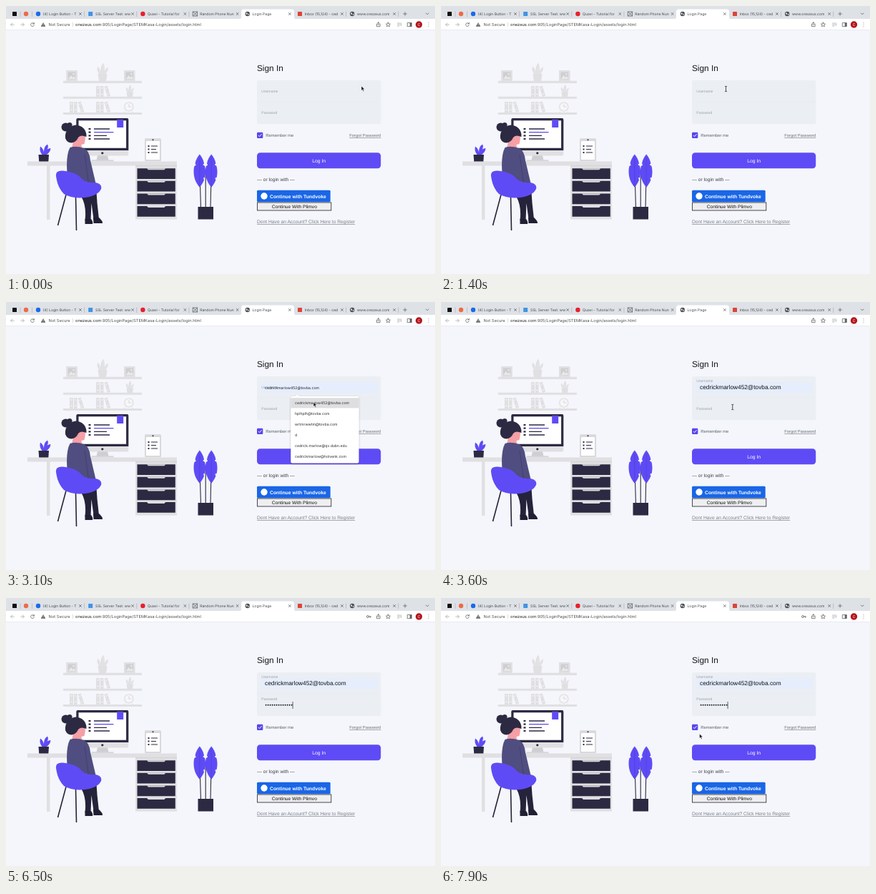
Recreate the animation shown at these times as an HTML page. Size 600 by 375 pixels, loop 8000 ms.

```html
<!DOCTYPE html>
<html lang="en">
<head>
<meta charset="utf-8">
<title>Login Page</title>
<style>
html, body { margin: 0; width: 100%; height: 100%; overflow: hidden; background: #f4f6fb; }
svg { display: block; width: 600px; height: 375px; }
text { font-family: "Liberation Sans", Arial, sans-serif; white-space: pre; text-rendering: geometricPrecision; }
.ui, .ui text { font-family: Inter, Roboto, sans-serif; }
.tabs text { font-size: 5.050px; fill: #45484d; }
.line { fill: none; stroke: #5f6368; stroke-width: .8; stroke-linecap: round; stroke-linejoin: round; }
.faint { stroke: #a9acb1; }
.hint { font-size: 5px; fill: #9a9fa8; }
.pale { fill: #e0e0e2; }
.ink { fill: #2c2a42; }
.hue { fill: #5f4bf5; }
</style>
</head>
<body>
<svg viewBox="0 0 600 375">
  <defs>
    <filter id="shade" x="-10%" y="-20%" width="120%" height="150%">
      <feDropShadow dx="0" dy=".8" stdDeviation="1.1" flood-color="#000" flood-opacity=".32"/>
    </filter>
    <g id="globe">
      <circle r="3.2" fill="#4a4d52"/>
      <path d="M-2.4-1.2Q-.6-2.4 0-.8T-1.4 1.3ZM.8.2L2.5-.5Q2.6 1.2 1 2.3Z" fill="#dfe2e7"/>
    </g>
    <g id="books">
      <path class="pale" d="M0 0h5v15h-5zM6 0h4.500v15h-4.500zM11.500.8l4.300-1.300 4.400 14.300-4.300 1.300z"/>
      <path d="M1 3h3M1 11.500h3M7 3h2.500M7 11.500h2.500M13 3.500l2.800-.9M15.500 11.500l2.800-.9" stroke="#f6f6f8" stroke-width="1"/>
    </g>
    <g id="frame">
      <path class="pale" d="M0 0h15.500v15H0z"/>
      <path d="M2.500 2.500h10.500v10h-10.500z" fill="#cfcfd2"/>
      <path d="M3 12l3.500-5 2.500 3 2-2 2 4z" fill="#e9e9eb"/>
      <circle cx="10.300" cy="5.200" r="1.200" fill="#e9e9eb"/>
    </g>
    <g id="sprig">
      <path d="M5 17Q-1 12 1 5Q6 9 6 16Q4 6 9 0Q13 7 8.500 17Q10 9 16 6Q16 13 10 17Z"/>
      <path d="M2 7L6 16M9 3L7.500 16M14.500 8L9 16" fill="none" stroke="#fff" stroke-opacity=".45" stroke-width=".5"/>
    </g>
    <g id="leaf">
      <path class="hue" d="M0-22.500C3-19 5.500-14.500 6.200-9.500L4.500-8L7.300-6C8.600-1 8.700 5 7.400 10L5.200 10.500L6.200 13.500C4.600 17.500 2.500 21 0 23.500C-2.500 21-4.600 17.500-6.200 13.500C-8.400 8-9-1-7.300-6L-5-7.500L-6.200-9.500C-5.500-14.500-3-19 0-22.500Z"/>
      <path d="M0-18V23" stroke="#4a3bcb" stroke-width=".5"/>
    </g>
    <g id="drawer">
      <path class="ink" d="M0 0h53.300v14.800H0z"/>
      <path d="M13.500 0h26.300l-2 2h-22.300z" fill="#dcdcdf"/>
    </g>
  </defs>

  <rect width="600" height="375" fill="#f4f6fb"/>

  <!-- browser -->
  <g class="ui">
    <rect width="600" height="19" fill="#dee1e6"/>
    <path d="M325 19Q329 19 329 15V8Q329 4.500 332.500 4.500H399.500Q403 4.500 403 8V15Q403 19 407 19Z" fill="#fff"/>
    <rect y="18" width="600" height="15.500" fill="#fff"/>
    <rect y="33.200" width="600" height=".6" fill="#dfe1e5"/>
    <g class="tabs" id="tabs"></g>
    <path class="line" d="M555.800 11h4.600M558.100 8.700v4.600M587.500 10l1.800 1.900 1.800-1.900"/>
    <path class="line faint" d="M11.300 26H6.700M8.800 23.800L6.600 26l2.200 2.200M20.700 26h4.600M23.200 23.800l2.200 2.200-2.200 2.200"/>
    <path class="line" d="M39 24.700a2.400 2.400 0 1 0 .3 2.100M39.300 23.300v1.700h-1.700"/>
    <path d="M52 22.900L55.300 28.700H48.700Z" fill="#5f6368"/>
    <path d="M52 24.700v2M52 27.300v.7" stroke="#fff" stroke-width=".6"/>
    <text x="59.600" y="28" font-size="5.700" fill="#4d5156">Not Secure</text>
    <path d="M93.500 23v6" stroke="#c5c8cd" stroke-width=".6"/>
    <text x="97" y="28" font-size="5.730" fill="#202124">onezeus.com<tspan fill="#4a4d52">:905/LoginPage/STEMKasa-Login/assets/login.html</tspan></text>
    <g id="key" class="line"><circle cx="506" cy="26" r="1.500"/><path d="M507.500 26h3M509.700 26v1.400"/></g>
    <path class="line" d="M519.300 25.200h-.8v3.500h4.600v-3.500h-.8M520.800 26.800v-3.900M519.500 24l1.300-1.300 1.300 1.300" stroke-width=".6"/>
    <path class="line" d="M534.500 23l.9 2 2.100.2-1.600 1.500.5 2.100-1.900-1.100-1.900 1.100.5-2.100-1.600-1.500 2.100-.2z" stroke-width=".6"/>
    <path class="line faint" d="M547.500 24h4M547.500 26h4M547.500 28h2.500M552.800 24v3.700"/>
    <path class="line" d="M561.700 23.500h5.600v5.200h-5.600z"/>
    <path d="M564.700 23.500h2.600v5.200h-2.600z" fill="#5f6368"/>
    <circle cx="577.500" cy="26" r="4.700" fill="#b5161f"/>
    <text x="577.500" y="27.900" font-size="5" fill="#fff" text-anchor="middle">C</text>
    <path d="M591 23.600v.01M591 26v.01M591 28.400v.01" class="line" stroke-width="1.300"/>
  </g>

  <!-- shelves -->
  <path class="pale" d="M80 104.800h110v3.300H80zM80 126.800h110v3H80zM80 149h110v3H80z"/>
  <use href="#frame" x="84.300" y="90"/><use href="#frame" x="165" y="90"/>
  <use href="#books" x="126" y="112"/><use href="#books" x="89" y="134"/><use href="#books" x="126" y="134"/>
  <g class="pale">
    <use href="#sprig" x="127" y="79.500"/>
    <path d="M128.500 95h13l-1.500 10h-10z"/>
    <use href="#sprig" transform="translate(167.500 110) scale(.7)"/>
    <path d="M168.500 120.500h9.500l-1 6.500h-7.500z"/>
    <circle cx="171.800" cy="141" r="6.800"/>
  </g>
  <path d="M167 147.500l-1.500 2M176.600 147.500l1.500 2" stroke="#e0e0e2"/>
  <circle cx="171.800" cy="141" r="5.400" fill="#f6f6f8"/>
  <path d="M171.800 137.500v3.500h3.300" fill="none" stroke="#c6c6ca" stroke-width=".6"/>

  <!-- desk -->
  <path class="pale" d="M30 217.500h209v6H30zM57 223h4.500v76H57zM181 223h58v75.500h-58z"/>
  <path d="M181 223.500h58" stroke="#cecfd3" stroke-width=".7"/>
  <use href="#drawer" x="183.500" y="227.200"/><use href="#drawer" x="183.500" y="244.800"/>
  <use href="#drawer" x="183.500" y="262.400"/><use href="#drawer" x="183.500" y="280"/>

  <!-- monitor -->
  <path d="M128 209h14l1.500 7h-17z" fill="#cfcfd3"/>
  <path d="M119.500 215.300h31v2.200h-31z" fill="#d6d6da"/>
  <rect x="98.300" y="157" width="73" height="52.500" rx="2" class="pale"/>
  <path class="ink" d="M98.300 202V159q0-2 2-2h69q2 0 2 2v43z"/>
  <path d="M101.500 160.300h66.600v38.400h-66.600z" fill="#fff"/>
  <circle class="ink" cx="134.800" cy="205.800" r="1.600"/>
  <path class="hue" d="M155.200 158.800h9v11.200h-9z"/>
  <path d="M115.500 172h3M115.500 176.700h3M115.500 181.400h3M115.500 186h3" stroke="#2c2a42" stroke-width="2.200"/>
  <path d="M123 172h22M123 181.400h18M123 186h22" stroke="#2c2a42" stroke-width="1.300"/>
  <path d="M123 176.700h27.500" stroke="#5f4bf5" stroke-width="1.300"/>

  <!-- tablet and pot -->
  <rect x="194" y="185.300" width="23" height="32" rx="1.500" fill="#d9d9dc"/>
  <path d="M196 189h19v26h-19z" fill="#fff"/>
  <circle class="ink" cx="205.500" cy="187.200" r="1"/>
  <path d="M198.500 196h2M198.500 200.500h2M198.500 205h2" stroke="#2c2a42" stroke-width="2"/>
  <path d="M203 196h9M203 200.500h7M203 205h9" stroke="#2c2a42" stroke-width="1"/>
  <path class="hue" d="M51 208.500Q46 203 48 196.500Q52.500 200 53 205Q52.500 197 58 193.500Q60 197 57.500 200.500Q60 199 62.500 199Q62 205 56 208.500Z"/>
  <path class="ink" d="M45.500 208h14.500l-.7 9.500H46.200z"/>

  <!-- tall plant -->
  <path d="M271.500 250L272.500 283M279.200 232V283M286.700 250L286 283" stroke="#2c2a42" stroke-width="1.100" fill="none"/>
  <use href="#leaf" transform="translate(270.800 230)"/>
  <use href="#leaf" transform="translate(287.200 230)"/>
  <path class="ink" d="M268.500 281h21.500v17.500h-21.500z"/>

  <!-- sitter -->
  <path d="M84 264L72.500 307M97.500 266L98.500 314" stroke="#25233a" stroke-width="1.600"/>
  <path d="M101 254L126 252Q127 275 130 298H122.500L119.500 276L118.500 300H110.500Q113 280 105 266Z" fill="#25233a"/>
  <path d="M110.500 298h8.500q3 4 2 7h-10.500zM122 296h8q5.500 5 5 8h-12.500z" fill="#211f33"/>
  <path d="M96 178L110 178Q112 184 109.500 193L105.500 194L106.500 200H92Z" fill="#f59fa6"/>
  <path d="M89.500 198Q98 195 109 199Q117 203 118 216L125.500 248Q128 260 122 262L104 264Q88 264 86 240Q83 210 89.500 198Z" fill="#504d80"/>
  <path d="M110 208Q113 230 117 259" stroke="#403d6b" stroke-width=".8" fill="none"/>
  <path class="ink" d="M83 185Q82 176 88.500 170Q97 163.500 106 169Q113 174 112.500 183Q104 179.500 101 184Q98 191 91.500 191.500Q85 191 83 185Z"/>
  <circle class="ink" cx="83.500" cy="169.500" r="6"/>
  <circle class="ink" cx="89" cy="166.500" r="3.500"/>
  <path class="hue" d="M70 238Q69 230 79 230.500Q98 232 105 241Q111 248 125 247Q135 249 133 256Q129 265 111 268Q92 270 81 263Q72 254 70 238Z"/>

  <!-- form -->
  <text x="351" y="90.600" font-size="11.800" fill="#15161a">Sign In</text>
  <rect x="351" y="104" width="173.300" height="61.200" rx="3" fill="#ebeff4"/>
  <path d="M351 134.500h173.300" stroke="#e6ebf0" stroke-width=".5"/>
  <rect id="fill" x="357" y="112.500" width="162.500" height="14.500" fill="#e6eefd"/>
  <text id="userHint" class="hint" x="357.300">Username</text>
  <text id="passHint" class="hint" x="357.300">Password</text>
  <text id="peek" class="ui" x="362" y="122.200" font-size="5.150" fill="#1d1e22"></text>
  <text id="user" x="362" y="122" font-size="8.300" fill="#111"></text>
  <g id="dots" fill="#17181c"></g>
  <rect id="caret" y="145" width=".7" height="10" fill="#222"/>
  <rect x="351" y="176.700" width="8.300" height="8.300" rx="1.200" fill="#5a46ec"/>
  <path d="M353 181l1.600 1.600 3-3.400" fill="none" stroke="#fff" stroke-width="1"/>
  <text x="363.300" y="183.400" font-size="5.900" fill="#5d6068">Remember me</text>
  <text x="480.300" y="183.200" font-size="5.830" fill="#6a6d75" text-decoration="underline">Forgot Password</text>
  <rect x="351" y="205.200" width="173.200" height="22" rx="4.500" fill="#5f4bf5"/>
  <text x="437.700" y="218.500" font-size="6.800" fill="#fff" text-anchor="middle">Log In</text>
  <text x="351.300" y="244.600" font-size="6.650" fill="#3f4249">— or login with —</text>
  <rect x="351" y="257.800" width="102.700" height="16.500" rx="1.500" fill="#1a66e6"/>
  <circle cx="361" cy="266" r="4.700" fill="#fff"/>
  <text x="369" y="268.500" font-size="6.840" font-weight="700" fill="#fff">Continue with Tundvoke</text>
  <rect x="351.500" y="275" width="103.300" height="11" fill="#efeff1" stroke="#33353a" stroke-width=".9"/>
  <text x="403.300" y="282.800" font-size="6.600" fill="#111" text-anchor="middle">Continue With Plimvo</text>
  <text x="351" y="304.200" font-size="6.690" fill="#7b7e86" text-decoration="underline">Dont Have an Account? Click Here to Register</text>

  <!-- popups -->
  <g id="menu" class="ui">
    <path d="M400 132h4.500l2.700-2.700 2.700 2.700H491.500q2 0 2 2v89.500q0 2-2 2H400.300q-2 0-2-2V134q0-2 2-2z" fill="#fff" filter="url(#shade)"/>
    <rect id="row" x="398.300" y="134.200" width="95.200" height="14.200" fill="#dedee1"/>
    <g id="list" font-size="5.150" fill="#2a2c31"></g>
  </g>
  <g id="tip" class="ui">
    <path d="M400.300 162.200h4.200l2.700-2.700 2.700 2.700H537q2 0 2 2v14.600q0 2-2 2H400.300q-2 0-2-2v-14.600q0-2 2-2z" fill="#fff" filter="url(#shade)"/>
    <circle cx="407" cy="171.500" r="3" fill="#ea4335"/>
    <text x="415" y="173.400" font-size="5.150" fill="#4a4d53">Use passwords saved in your Quorve Account</text>
  </g>

  <g id="arrow"><path d="M0 0V6.300L1.500 5L2.600 7.500L3.700 7L2.600 4.600H4.600Z" fill="#111" stroke="#fff" stroke-width=".5"/></g>
  <g id="beam"><path d="M-1.500-3.700Q0-3.700 0-3Q0-3.700 1.500-3.700M0-3V3M-1.500 3.700Q0 3.700 0 3Q0 3.700 1.500 3.700" fill="none" stroke="#222" stroke-width=".8"/></g>
</svg>
<script>
const $ = id => document.getElementById(id);
const show = (id, on) => $(id).setAttribute('display', on ? 'inline' : 'none');
const put = (id, name, value) => $(id).setAttribute(name, value);

const mails = ['cedrickmarlow452@tovba.com', 'hplhplh@tovba.com', 'wrtmrwwtm@tovba.com',
  'd', 'cedrick.marlow@qv.dubn.edu', 'cedrickmarlow@holvenk.com'];
$('list').innerHTML = mails.map((m, i) => `<text x="404" y="${143.1 + i * 15}">${m}</text>`).join('');
$('peek').textContent = $('user').textContent = mails[0];

const block = (x, color) => `<rect x="${x - 3}" y="8" width="6" height="6" rx=".6" fill="${color}"/>`;
const disc = (x, color) => `<circle cx="${x}" cy="11" r="3.2" fill="${color}"/>`;
const globe = x => `<use href="#globe" x="${x}" y="11"/>`;
const crossed = x => `<path class="line" d="M${x - 3} 8h6v6h-6zl6 6m0-6l-6 6" stroke-width=".7"/>`;
const tabs = [
  [disc, '#1a6be8', '(4) Login Button - T'],
  [block, '#3f95e6', 'SSL Server Test: ww'],
  [disc, '#e8202a', 'Quavi - Tutorial for'],
  [crossed, '', 'Random Phone Nun'],
  [globe, '', 'Login Page'],
  [block, '#dc4437', 'Inbox (15,124) - ced'],
  [globe, '', 'www.onezeus.com']
];
const rule = x => `<path d="M${x} 7.500v7.500" stroke="#a6a9ae" stroke-width=".6"/>`;
$('tabs').innerHTML = block(12, '#111') + disc(28, '#ee6b45') + rule(20) + rule(36.500) +
  tabs.map(([icon, color, name], i) => {
    const x = 45 + i * 73.200;
    const edge = i === 3 || i === 4 ? '' : rule(x + 64.500);
    return icon(x, color) + `<text x="${x + 6.700}" y="12.900">${name}</text>` +
      `<path class="line" d="M${x + 57.500} 9.500l3 3m0-3l-3 3" stroke-width=".7"/>` + edge;
  }).join('');

const OPEN = 1500, PICK = 3200, FOCUS = 3900, TYPE = 5000, DONE = 6500, COUNT = 13;
$('dots').innerHTML = Array.from({ length: COUNT }, (_, i) =>
  `<circle cx="${363.600 + i * 3}" cy="149.800" r=".95"/>`).join('');
const dots = [...$('dots').children];

// time, x, y
const path = [[0, 497, 112], [700, 439, 120], [900, 424, 120], [1000, 424, 120], [1300, 398.500, 116],
  [2100, 398.500, 116], [2800, 430, 140], [3200, 430, 140], [3800, 400, 149.500],
  [6600, 400, 149.500], [7800, 361.500, 190], [8000, 361.500, 190]];

function pointer(t) {
  const i = path.findIndex((p, k) => k && t <= p[0]);
  const [a, b] = [path[i - 1], path[i]];
  const u = (t - a[0]) / (b[0] - a[0]);
  const e = t < 1000 ? u : u * u * (3 - 2 * u);
  return [a[1] + (b[1] - a[1]) * e, a[2] + (b[2] - a[2]) * e];
}

const blink = (t, start) => (t - start) % 1000 < 500;

function draw(t) {
  const [x, y] = pointer(t);
  const menu = t >= OPEN && t < PICK;
  const hover = menu && y > 133;
  const filled = t >= PICK;
  const typed = t < TYPE ? 0 : Math.min(COUNT, 1 + Math.floor((t - TYPE) * (COUNT - 1) / (DONE - TYPE)));

  show('menu', menu);
  show('row', hover);
  show('peek', hover);
  show('fill', hover || filled);
  show('user', filled);
  put('userHint', 'y', filled ? 112.300 : 121);
  put('passHint', 'y', typed ? 142.800 : 151.200);
  show('tip', t >= FOCUS && !typed);
  show('key', typed > 0);
  dots.forEach((d, i) => d.setAttribute('display', i < typed ? 'inline' : 'none'));

  let on = false;
  if (menu) on = !hover && blink(t, OPEN);
  else if (t >= FOCUS) on = typed && t < DONE || blink(t, typed ? DONE : FOCUS);
  show('caret', on);
  put('caret', 'x', typed ? 361.700 + typed * 3 : 362.200);
  put('caret', 'y', menu ? 114.500 : 145);

  const hidden = t >= TYPE && t <= 6600;
  const beam = t >= 1000 && y < 165 && !(menu && y > 131);
  show('beam', beam && !hidden);
  show('arrow', !beam && !hidden);
  for (const id of ['beam', 'arrow']) put(id, 'transform', `translate(${x} ${y})`);
}

const begin = performance.now();
function tick() {
  const t = (performance.now() - begin) % 8000;
  draw(Math.floor(t / 100) * 100);
  requestAnimationFrame(tick);
}
tick();
</script>
</body>
</html>
```
